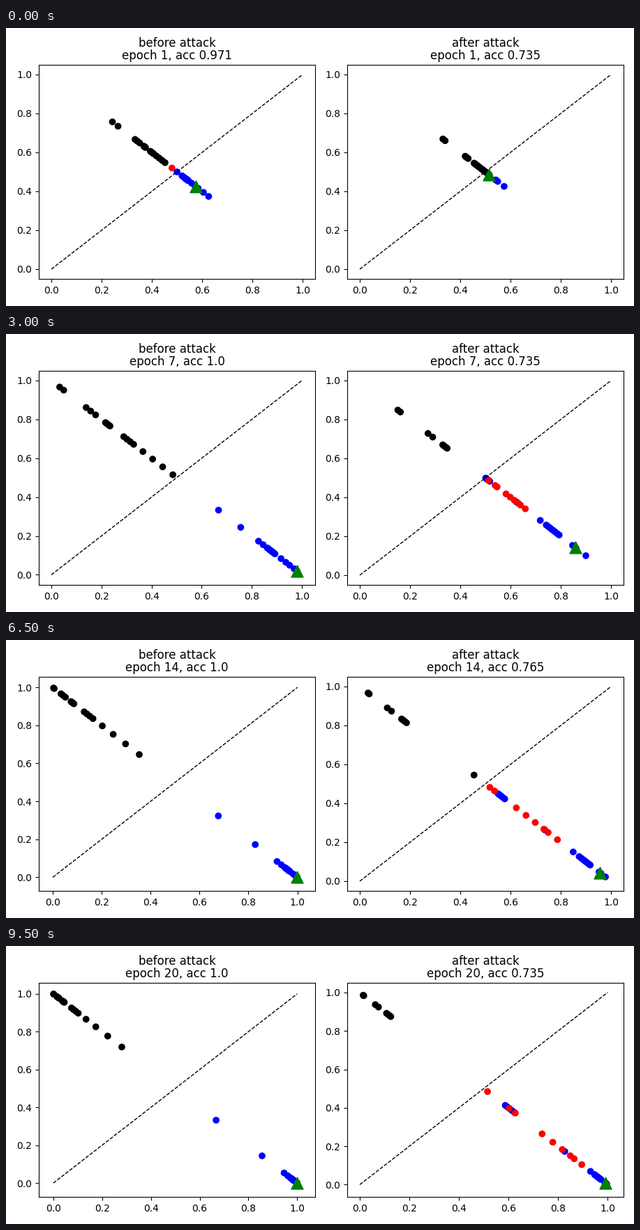
Animation, 900 px wide and 400 px high, one loop 10000 ms. Source, as a matplotlib script:

```python
import matplotlib.pyplot as plt
import numpy as np
from matplotlib.animation import FuncAnimation

WIDTH, HEIGHT, DPI = 900, 400, 100
EPOCHS = 20

# Half extents of the markers in data units, used for the axis limits.
STAR_PAD = np.array([0.0222, 0.0217])
DOT_PAD = np.array([0.0088, 0.0075])


def clock(epoch):
    """Training slows down: equal steps of this clock are equal progress."""
    return np.log(np.asarray(epoch) + 3)


def path(keys, epoch):
    return np.interp(clock(epoch), clock(list(keys)), list(keys.values()))


def sigmoid(z):
    return 1 / (1 + np.exp(-z))


class Group:
    """Dots with a fixed spacing in logit space that shifts and stretches.

    The shape gives the offset at a few ranks, base is the logit of the
    first dot and reach the stretch of the offsets, keyed by epoch.
    """

    def __init__(self, shape, base, reach):
        ranks = np.arange(max(shape) + 1)
        self.offsets = np.interp(ranks, list(shape), list(shape.values()))
        self.base, self.reach = base, reach

    def at(self, epoch):
        return sigmoid(path(self.base, epoch) + path(self.reach, epoch) * self.offsets)


before = {
    "title": "before attack",
    "blue": [Group({0: 0, 2: 1.07, 4: 1.4, 11: 1.75, 14: 2.8, 16: 3.97},
                   base={1: -.08, 5: .584, 9: .787, 20: .697},
                   reach={1: .15, 5: .58, 9: 1, 20: 2.03})],
    "black": [Group({0: 0, 4: .78, 7: 1, 8: 1.34, 11: 1.46, 12: 1.76, 14: 2.1, 15: 3.45, 16: 3.94},
                    base={1: -.19, 5: .024, 7: -.06, 9: -.215, 20: -.94},
                    reach={1: -.24, 5: -.645, 9: -1, 20: -1.58})],
    "star": {1: .306, 5: 2.88, 9: 4.76, 20: 8.5},
}

after = {
    "title": "after attack",
    "blue": [Group({0: 0, 2: .03, 4: .07, 5: .54, 6: 1, 7: 1.13, 13: 1.44, 14: 1.83, 15: 1.95, 16: 2.35},
                   base={1: -.31, 5: -.03, 9: .033, 20: .352},
                   reach={1: .26, 5: .85, 9: 1, 12: 1.23, 20: 2.25})],
    "black": [Group({0: 0, 3: .1, 4: .34, 5: .46, 6: 1.31, 7: 1.41},
                    base={1: -.14, 5: -.257, 9: -.934, 20: -1.946},
                    reach={1: -.4, 5: -.5, 9: -1, 20: -1.65}),
              Group({0: 0, 1: .17, 2: .22, 3: .46, 6: .8, 7: .86, 8: 1},
                    base={1: -.128, 5: .278, 9: -.13, 12: -.282, 20: .062},
                    reach={1: .12, 5: .375, 9: .793, 20: 2.09})],
    "star": {1: .056, 5: 1.696, 9: 1.883, 12: 2.41, 20: 4.76},
}

fig = plt.figure(figsize=(WIDTH / DPI, HEIGHT / DPI), dpi=DPI)


def add_panel(left):
    return fig.add_axes([left / WIDTH, 39 / HEIGHT, 396 / WIDTH, 308 / HEIGHT])


panels = [(add_panel(47), before), (add_panel(489), after)]


def set_limits(ax, probs, star):
    """Fit the unit square and all markers, plus a margin of 5 %."""
    dots = np.column_stack([probs, 1 - probs])
    tip = np.array([star, 1 - star])
    low = np.min([[0, 0], dots.min(0) - DOT_PAD, tip - STAR_PAD], axis=0)
    high = np.max([[1, 1], dots.max(0) + DOT_PAD, tip + STAR_PAD], axis=0)
    margin = 0.05 * (high - low)
    (x0, y0), (x1, y1) = low - margin, high + margin
    ax.set(xlim=(x0, x1), ylim=(y0, y1))


def draw_panel(ax, data, epoch):
    ax.clear()
    blue, black = (np.concatenate([group.at(epoch) for group in data[name]])
                   for name in ("blue", "black"))
    star = sigmoid(path(data["star"], epoch))
    probs = np.concatenate([blue, black])
    correct = np.concatenate([blue > 0.5, black < 0.5])
    names = ["blue"] * len(blue) + ["black"] * len(black)
    colors = [name if ok else "red" for name, ok in zip(names, correct)]

    ax.scatter(probs, 1 - probs, c=colors)
    ax.scatter(star, 1 - star, s=150, c="green", marker="^")
    ax.plot([0, 1], [0, 1], "k--", lw=1)
    set_limits(ax, probs, star)
    accuracy = round(float(correct.mean()), 3)
    ax.set_title(f"{data['title']}\nepoch {epoch}, acc {accuracy}", linespacing=1.0)


def update(frame):
    for ax, data in panels:
        draw_panel(ax, data, frame + 1)
    return []


anim = FuncAnimation(fig, update, frames=EPOCHS, interval=500,
                     repeat=True, repeat_delay=0, blit=False)
plt.show()
```
